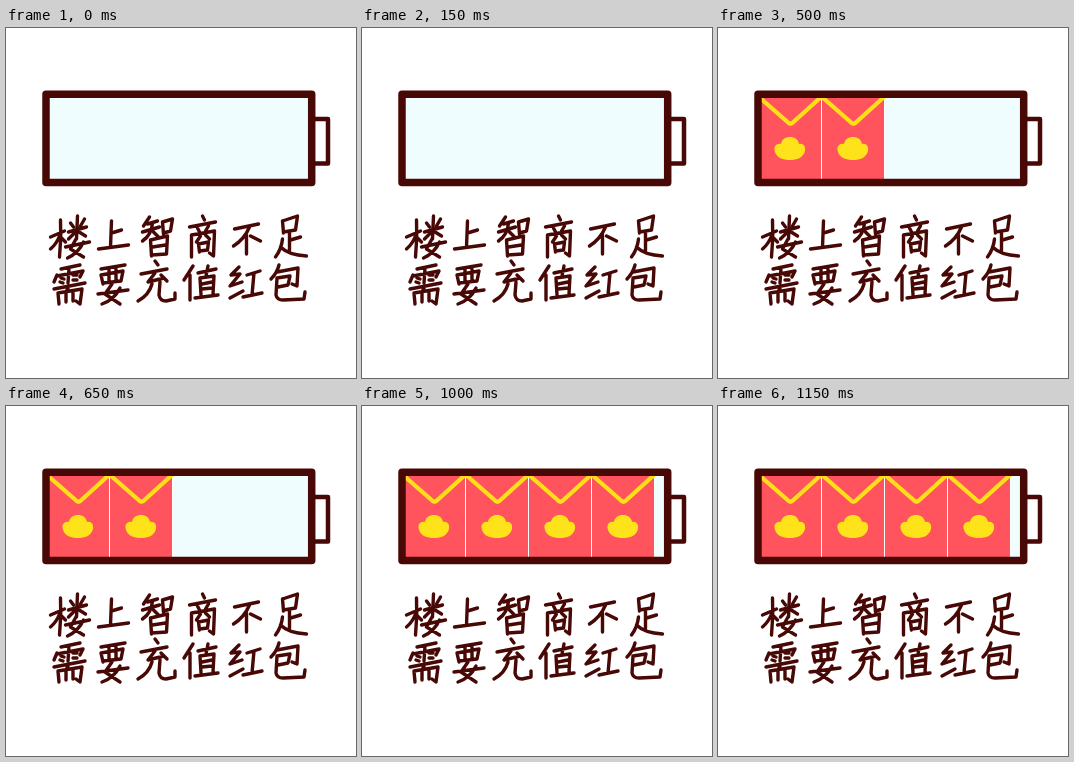
Animation of 350x350 px, one loop 1250 ms. Source, as an HTML page:

```html
<!DOCTYPE html>
<html lang="zh">
<head>
<meta charset="utf-8">
<title>充值红包</title>
<style>
  html, body { margin: 0; width: 100%; height: 100%; overflow: hidden; background: #fff; }
  svg { display: block; width: 350px; height: 350px; }
  .ink { fill: none; stroke: #480805; stroke-linecap: round; stroke-linejoin: round; }
  .pen { stroke-width: 3.4; }
</style>
</head>
<body>
<svg viewBox="0 0 350 350" role="img" aria-label="楼上智商不足 需要充值红包">
  <defs>
    <g id="envelope">
      <path fill="#ff545e" d="M0 66H62V153H0Z"/>
      <path fill="#fff" d="M62 66h1V153h-1Z"/>
      <path fill="none" stroke="#ffe018" stroke-width="4.300" stroke-linejoin="round" d="M0 69L28 93.500Q31.500 98 35 93.500L62 69"/>
      <path fill="#ffe31a" d="M22 116C23 106.500 39 106.500 40 116C44 115 47 118 46 123C44 130 38 132 31 132C24 132 18 130 16 124C14 118 18 115 22 116Z"/>
    </g>
  </defs>

  <path fill="#f0fdff" d="M40 66H306V154H40Z"/>
  <g id="cells"></g>
  <path class="ink" stroke-width="4.500" d="M308 91H322V135.500H308"/>
  <path class="ink" stroke-width="7.500" d="M40 66.200H305.700V154.500H40Z"/>

  <g id="text" class="ink pen">
    <!-- 楼上智商不足 -->
    <g transform="translate(1.500)">
      <path d="M43 209L57 203M53 192Q54 210 52 229M52 208Q49 216 43 221M54 210L58 214M63 195L66 199M77 191L73 198M61 204L79 199M70 188L69 211M69 203L61 211M70 203L78 208M69 210L63 221L76 229M76 214Q71 225 60 230M58 219L82 214"/>
      <path d="M104 193L103 219M104 205L114 202M91 221L121 217"/>
      <path d="M142 189L136 198M140 196L150 193M135 204L152 199M145 195Q144 207 135 213M146 204L151 209M155 194L156 206M155 194L165 191L163 203L156 205M143 212L144 228M143 212L160 208L159 226L144 227M145 219L158 217"/>
      <path d="M195 188L197 192M182 199L208 194M190 200L192 204M201 198L198 203M184 207V229M184 207L207 203L206 228L202 225M193 208L189 214M198 207L202 211M191 216L192 224M191 216L201 214L200 222L192 223"/>
      <path d="M227 201L251 196M242 199Q237 211 226 218M239 207V226M243 208L253 213"/>
      <path d="M275 193L276 205M275 193L290 188L288 202L276 204M282 204V222M283 212L293 209M275 211Q274 221 268 229M273 219Q281 227 299 228"/>
    </g>
    <!-- 需要充值红包 -->
    <path d="M55 241L74 237M51 247L48 254M51 248L77 243L74 249M63 240L62 255M55 250L58 251M54 254L57 255M67 247H71M67 252H71M48 261L79 255M63 258L60 264M52 265L53 276M52 265L76 261L74 276L70 273M60 265V274M67 264V273"/>
    <path d="M95 241L119 237M95 247L97 256M95 247L117 243L115 253L97 255M103 241V254M110 240V253M106 256L99 266L114 276M114 260Q108 272 96 276M92 266L122 262"/>
    <path d="M149 233L152 237M135 246L161 241M149 245L142 254L158 250M155 247L161 253M146 256Q143 267 132 273M154 254L153 267Q154 273 160 273L169 271V265"/>
    <path d="M187 238L178 252M184 247V272M192 245L210 241M202 238L200 248M194 250L195 267M194 250L208 248L207 266M196 256L206 254M196 261L206 260M189 270L212 267"/>
    <path d="M233 239L225 247L234 246L224 258L236 254M224 270L237 263M241 247L254 243M248 245L246 267M237 269L256 265"/>
    <path d="M273 237Q271 245 265 251M271 244L292 240L291 258L286 256M271 250L284 248L282 257L272 259M271 250L270 267Q271 272 277 272L298 271L299 264"/>
  </g>
</svg>
<script>
  const STEP = 250, CELLS = 4, PITCH = 63, LEFT = 41, HOP = 4;
  const group = document.getElementById('cells');
  const text = document.getElementById('text');
  const cells = Array.from({ length: CELLS }, (_, i) => {
    const cell = document.createElementNS('http://www.w3.org/2000/svg', 'use');
    cell.setAttribute('href', '#envelope');
    cell.setAttribute('x', LEFT + i * PITCH);
    group.appendChild(cell);
    return cell;
  });

  // Each step adds an envelope, then the battery empties; the text hops on odd steps.
  function draw(time) {
    const filled = Math.floor(time / STEP) % (CELLS + 1);
    cells.forEach((cell, i) => {
      cell.style.display = i < filled ? '' : 'none';
    });
    text.setAttribute('transform', `translate(0 ${filled % 2 ? -HOP : 0})`);
  }

  function tick() {
    draw(performance.now() - start);
    requestAnimationFrame(tick);
  }

  const start = performance.now();
  draw(0);
  requestAnimationFrame(tick);
</script>
</body>
</html>
```
